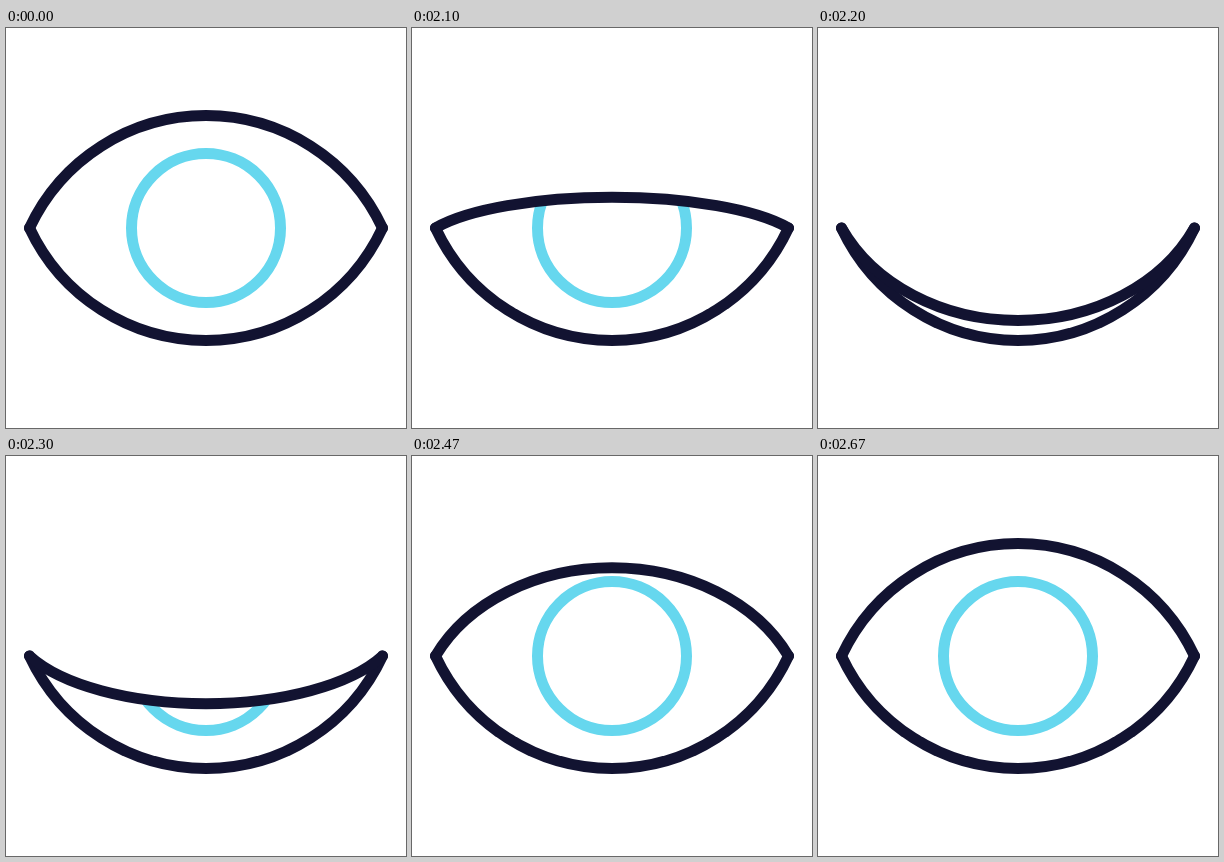
Animation of 400 by 400 pixels, one loop 2.7 s. Source, as an HTML page:

```html
<!DOCTYPE html>
<html lang="en">
<head>
<meta charset="utf-8">
<title>Blinking eye</title>
<style>
  html, body { margin: 0; width: 100%; height: 100%; overflow: hidden; background: #fff; }
  svg { display: block; width: 100%; height: 100%; }
  path, circle { fill: none; stroke-width: 11; stroke-linecap: round; stroke-linejoin: round; }
  .lid { stroke: #121331; }
  .iris { stroke: #66d7ee; }
</style>
</head>
<body>
<svg viewBox="0 0 400 400">
  <clipPath id="below"><path id="mask"/></clipPath>
  <circle class="iris" cx="200" cy="200" r="74.5" clip-path="url(#below)"/>
  <path class="lid" id="lower"/>
  <path class="lid" id="upper"/>
</svg>
<script>
  const LOOP = 2700;
  const CLOSE = [2000, 2245];
  const OPEN = [2255, 2675];

  const get = id => document.getElementById(id);
  const mask = get('mask'), upper = get('upper'), lower = get('lower');

  const progress = (t, [from, to]) => Math.min(1, Math.max(0, (t - from) / (to - from)));
  const easeInOut = p => p * p * (3 - 2 * p);
  const easeOut = p => 1 - (1 - p) ** 3;

  // Arc between the eye corners; lift runs from 1 (raised) to -1 (lowered).
  function lidPath(lift) {
    const side = 200 - 68.6 * lift, apex = 200 - 112.5 * lift;
    return `M23.5 200C55.5 ${side} 124.3 ${apex} 200 ${apex}S344.5 ${side} 376.5 200`;
  }

  function draw(t) {
    const shut = easeInOut(progress(t, CLOSE)) - easeOut(progress(t, OPEN));
    const d = lidPath(1 - 2 * shut);
    upper.setAttribute('d', d);
    mask.setAttribute('d', d + 'V400H23.5Z');
  }

  // 40 poses per second, each shown on a 10 ms boundary
  const snap = t => 50 * Math.floor(t / 50) + (t % 50 >= 20 ? 25 : 0);

  lower.setAttribute('d', lidPath(-1));
  draw(0);
  const start = performance.now();
  function tick() {
    draw(snap((performance.now() - start) % LOOP));
    requestAnimationFrame(tick);
  }
  requestAnimationFrame(tick);
</script>
</body>
</html>
```
